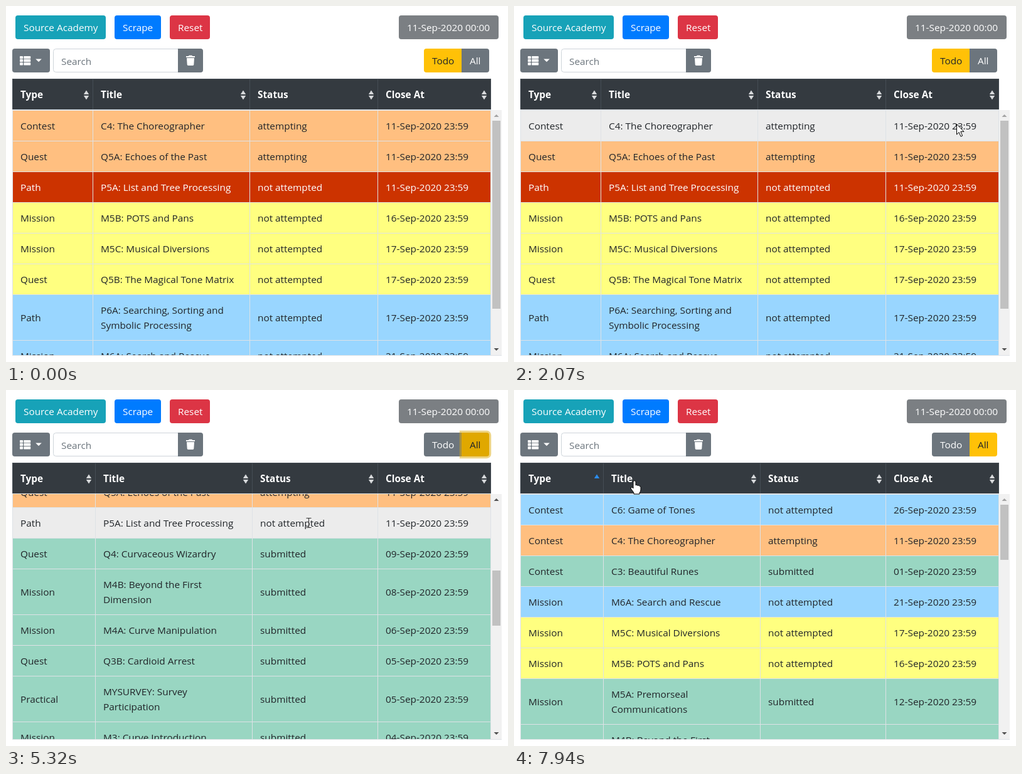
Recreate the animation shown at these times as an HTML page. Size 800x568 px, loop 8000 ms.

```html
<!DOCTYPE html>
<html lang="en">
<head>
<meta charset="utf-8">
<title>Assessment list</title>
<style>
  html, body { margin: 0; width: 100%; height: 100%; overflow: hidden; background: #fff; }
  svg { display: block; width: 800px; height: 568px; }
  text { font: 15.35px "Open Sans", "Noto Sans", sans-serif; fill: #212529; white-space: pre; }
  .bold { font-weight: 700; }
  .white { fill: #fff; }
  .crisp rect { shape-rendering: crispEdges; }
</style>
</head>
<body>
<script>
const LOOP = 8000, FIRST = 204, STEP = 77.3;
const TOP = 166, BOTTOM = 557, ROW = 49, LEADING = 24;
const DARK = '#212529', LINE = '#dee2e6', HOVER = '#ececec';
const GREY = [108, 117, 125], GREY_HOVER = [90, 98, 104];
const AMBER = [255, 193, 7], AMBER_FOCUS = [224, 168, 0];

// Moments counted in steps
const OVER_ALL = 31, CLICK_ALL = 36, CLICK_TYPE = 86;

// from, to, then where the pointer arrives
const MOVES = [
  [-1, 4, 652, 411], [18, 24, 705, 188], [24, 32, 750, 99], [44, 52, 482.5, 212],
  [66, 70, 487, 219], [75, 84, 76, 151], [96, 100, 192, 144]
];
// from, to, then the scroll position reached
const SCROLLS = [
  [6.2, 8.8, 75], [14.8, 17.8, 0], [52.5, 54, 75], [54, 59, 480], [65.6, 68.6, 240], [71.2, 73.2, 0]
];

const KINDS = { C: 'Contest', M: 'Mission', Q: 'Quest', P: 'Path' };
const LOOKS = {
  b: ['#99d6ff', 'not attempted'],
  y: ['#ffff80', 'not attempted'],
  r: ['#cc3300', 'not attempted'],
  o: ['#ffbf80', 'attempting'],
  g: ['#99d6c2', 'submitted']
};

// id | title, "/" breaks the line | closing day | look
const ITEMS = `C6|Game of Tones|26|b
M6A|Search and Rescue|21|b
M5C|Musical Diversions|17|y
Q5B|The Magical Tone Matrix|17|y
P6A|Searching, Sorting and/Symbolic Processing|17|b
M5B|POTS and Pans|16|y
M5A|Premorseal/Communications|12|g
C4|The Choreographer|11|o
Q5A|Echoes of the Past|11|o
P5A|List and Tree Processing|11|r
Q4|Curvaceous Wizardry|09|g
M4B|Beyond the First/Dimension|08|g
M4A|Curve Manipulation|06|g
Q3B|Cardioid Arrest|05|g
MYSURVEY|Survey/Participation|05|g
M3|Curve Introduction|04|g
C3|Beautiful Runes|01|g`.split('\n').map(s => {
  const [id, title, day, look] = s.split('|');
  return {
    id, look, day, lines: `${id}: ${title}`.split('/'),
    kind: id === 'MYSURVEY' ? 'Practical' : KINDS[id[0]],
    date: `${day}-Sep-2020 23:59`
  };
});
const open = ITEMS.filter(r => r.look !== 'g').sort((a, b) => a.day - b.day);
const byKind = [...ITEMS].sort((a, b) => a.kind.localeCompare(b.kind));

function el(tag, attrs, parent, text) {
  const e = document.createElementNS('http://www.w3.org/2000/svg', tag);
  for (const k in attrs) e.setAttribute(k, attrs[k]);
  if (text !== undefined) e.textContent = text;
  if (parent) parent.appendChild(e);
  return e;
}
const svg = el('svg', { viewBox: '0 0 800 568' }, document.body);
const rect = (p, x, y, width, height, fill) => el('rect', { x, y, width, height, fill }, p);
const label = (p, x, y, s, cls = '') => el('text', { x, y, class: cls }, p, s);
const shape = (p, d, fill = '#fff') => el('path', { d, fill }, p);

// Box with separate corner radii on its left and right sides
const boxPath = (x, y, w, h, l, r) =>
  `M${x + l} ${y}H${x + w - r}a${r} ${r} 0 0 1 ${r} ${r}V${y + h - r}a${r} ${r} 0 0 1 ${-r} ${r}` +
  `H${x + l}a${l} ${l} 0 0 1 ${-l} ${-l}V${y + l}a${l} ${l} 0 0 1 ${l} ${-l}z`;
const box = (x, y, w, fill, l = 4, r = 4) => shape(svg, boxPath(x, y, w, 38, l, r), fill);

function button(x, w, fill, s) {
  box(x, 15, w, fill);
  label(svg, x + 13, 40, s, 'white');
}

function drawToolbar() {
  button(15, 144, '#17a2b8', 'Source Academy');
  button(173, 74, '#007bff', 'Scrape');
  button(261, 64, '#dc3545', 'Reset');
  button(626, 159, '#7b7f83', '11-Sep-2020 00:00');

  box(10, 68, 60, '#6c757d');
  for (let y = 80; y < 92; y += 5.1) {
    shape(svg, boxPath(22, y, 5, 4.2, .7, .7));
    shape(svg, boxPath(28.2, y, 11, 4.2, .7, .7));
  }
  shape(svg, 'M47.2 84.5h9.6l-4.8 4.8z');

  shape(svg, boxPath(75.5, 68.5, 199, 37, 4, 0)).setAttribute('stroke', '#ced4da');
  label(svg, 88, 94, 'Search').style.fill = '#6c757d';
  box(274, 68, 40, '#6c757d', 0, 4);
  shape(svg, 'M287 80h3.8l1-1.2h4.4l1 1.2h3.8v2h-14zM288 83h12l-.7 10.6q-.1 1.4-1.5 1.4h-7.6q-1.4 0-1.5-1.4z');
}
drawToolbar();

const todo = box(666, 68, 60, '', 4, 0);
const ring = shape(svg, boxPath(722.8, 64.8, 50.4, 44.4, 0, 7.2), 'rgb(222,170,12)');
const all = box(726, 68, 44, '', 0, 4);
const todoText = label(svg, 679, 93, 'Todo');
const allText = label(svg, 739, 93, 'All');

const clip = el('clipPath', { id: 'view' }, el('defs', {}, svg));
rect(clip, 10, TOP, 763, BOTTOM - TOP);
rect(svg, 773, TOP, 17, BOTTOM - TOP, '#f1f1f1');
const upArrow = shape(svg, 'M777.5 177h8l-4-4z');
shape(svg, 'M777.5 546h8l-4 4z', '#505050');

// titleAt: left edge of the second column; total: full height of the scrolled rows
function makeTable(items, titleAt, total, sorted) {
  const edges = [10, titleAt, titleAt + 250, 592, 772];
  const g = el('g', { class: 'crisp' }, svg);
  const body = el('g', {}, el('g', { 'clip-path': 'url(#view)' }, g));
  let y = TOP;
  const rows = items.map(item => {
    const extra = (item.lines.length - 1) * LEADING, h = ROW + extra;
    const [fill, status] = LOOKS[item.look];
    const back = rect(body, 10, y, 763, h, fill);
    const texts = el('g', {}, body);
    const put = (col, dy, s) => label(texts, edges[col] + 13, y + 31 + dy, s);
    put(0, extra / 2, item.kind);
    item.lines.forEach((s, i) => put(1, i * LEADING, s));
    put(2, extra / 2, status);
    put(3, extra / 2, item.date);
    rect(body, 10, y, 763, 1, LINE);
    const row = { y, h, back, texts, fill, red: item.look === 'r' };
    y += h;
    return row;
  });
  edges.forEach(x => rect(body, x, TOP, 1, y - TOP, LINE));

  rect(g, 10, 116, 763, ROW, '#343a40');
  rect(g, 10, 116, 763, 1, '#454d55');
  rect(g, 10, 165, 763, 1, LINE);
  ['Type', 'Title', 'Status', 'Close At'].forEach((s, i) => {
    const x = edges[i + 1] - 10, active = sorted && i === 0;
    label(g, edges[i] + 13, 147, s, 'bold white');
    shape(g, `M${x - 4.2} 141h8.4l-4.2-6.6z`, active ? '#2b8ceb' : '#d6d8da');
    if (!active) shape(g, `M${x - 4.2} 143h8.4l-4.2 6.6z`, '#d6d8da');
  });
  edges.forEach(x => rect(g, x, 116, 1, ROW, '#454d55'));

  const track = 358, view = BOTTOM - TOP;
  const thumb = Math.round(track * view / total);
  const bar = rect(g, 775, 183, 13, thumb, '#c1c1c1');
  return { g, body, rows, bar, ratio: (track - thumb) / (total - view) };
}
const tables = [
  makeTable(open, 138, 466),
  makeTable(ITEMS, 142, 1590),
  makeTable(byKind, 142, 1590, true)
];
rect(svg, 10, BOTTOM, 780, 1, LINE);

const pen = { fill: '#fff', stroke: '#000', 'stroke-linejoin': 'round' };
const cursors = {
  arrow: el('path', { d: 'M.5 .5V17L4.2 13.4 7 20.2 9.7 19 6.8 12.4H12z', ...pen }, svg),
  hand: el('path', {
    d: 'M-2 2Q0-1 2 2V8Q3.5 6.6 5 8.4 7 7.4 8 9.4 10 9 10 11.5V15Q10 18 8 20V22H-1V20Q-3 17-5.6 13.6-6.4 11-4 11L-2 13z',
    ...pen
  }, svg),
  beam: el('path', { d: 'M-4-7.5H4M0-7.5V7.5M-4 7.5H4', stroke: '#333' }, svg)
};

const clamp = v => Math.max(0, Math.min(1, v));
const smooth = u => u * u * (3 - 2 * u);
const lerp = (a, b, f) => a + (b - a) * f;
const ramp = (k, from) => clamp((k - from + 1) / 3);
const mix = (a, b, f) => `rgb(${a.map((v, i) => Math.round(lerp(v, b[i], f)))})`;
const show = (e, on) => { e.style.display = on ? '' : 'none'; };

// Eases through a list of [from, to, ...goal]
const follow = (list, k, start) => list.reduce((at, [from, to, ...goal]) => {
  const f = smooth(clamp((k - from) / (to - from)));
  return at.map((v, i) => lerp(v, goal[i], f));
}, start);

function pointerKind(x, y) {
  if (x > 726 && y < 106 || y >= 116 && y < TOP) return 'hand';
  return x > 405 && x < 507 ? 'beam' : 'arrow';
}

function render(t) {
  const k = Math.floor((t - FIRST) / STEP);
  const [x, y] = follow(MOVES, k, [636, 568]);
  const scroll = Math.round(follow(SCROLLS, k, [0])[0]);
  const current = k < CLICK_ALL ? 0 : k < CLICK_TYPE ? 1 : 2;

  tables.forEach((table, i) => show(table.g, i === current));
  const table = tables[current];
  table.body.setAttribute('transform', `translate(0 ${-scroll})`);
  table.bar.setAttribute('y', 183 + Math.round(scroll * table.ratio));
  upArrow.setAttribute('fill', scroll ? '#505050' : '#a3a3a3');

  // The hovered row changes only once a scroll has come to rest
  const [, , rest = 0] = SCROLLS.filter(s => s[1] <= k).pop() || [];
  for (const r of table.rows) {
    const on = k >= 0 && y > TOP && y + rest >= r.y && y + rest < r.y + r.h;
    r.back.setAttribute('fill', on ? HOVER : r.fill);
    for (const s of r.texts.children) s.style.fill = r.red && !on ? '#fff' : DARK;
  }

  const click = ramp(k, CLICK_ALL), blur = ramp(k, CLICK_TYPE);
  const idle = mix(GREY, GREY_HOVER, ramp(k, OVER_ALL));
  todo.setAttribute('fill', mix(AMBER, GREY, click));
  all.setAttribute('fill', !click ? idle
    : blur ? mix(AMBER_FOCUS, AMBER, blur) : mix(GREY_HOVER, AMBER_FOCUS, click));
  todoText.style.fill = click ? '#fff' : DARK;
  allText.style.fill = click ? DARK : '#fff';
  ring.setAttribute('opacity', .5 * click * (1 - blur));

  const kind = pointerKind(x, y);
  for (const name in cursors) {
    show(cursors[name], k >= 0 && name === kind);
    cursors[name].setAttribute('transform', `translate(${x} ${y})`);
  }
}

const start = performance.now();
function tick() {
  render((performance.now() - start) % LOOP);
  requestAnimationFrame(tick);
}
tick();
</script>
</body>
</html>
```
